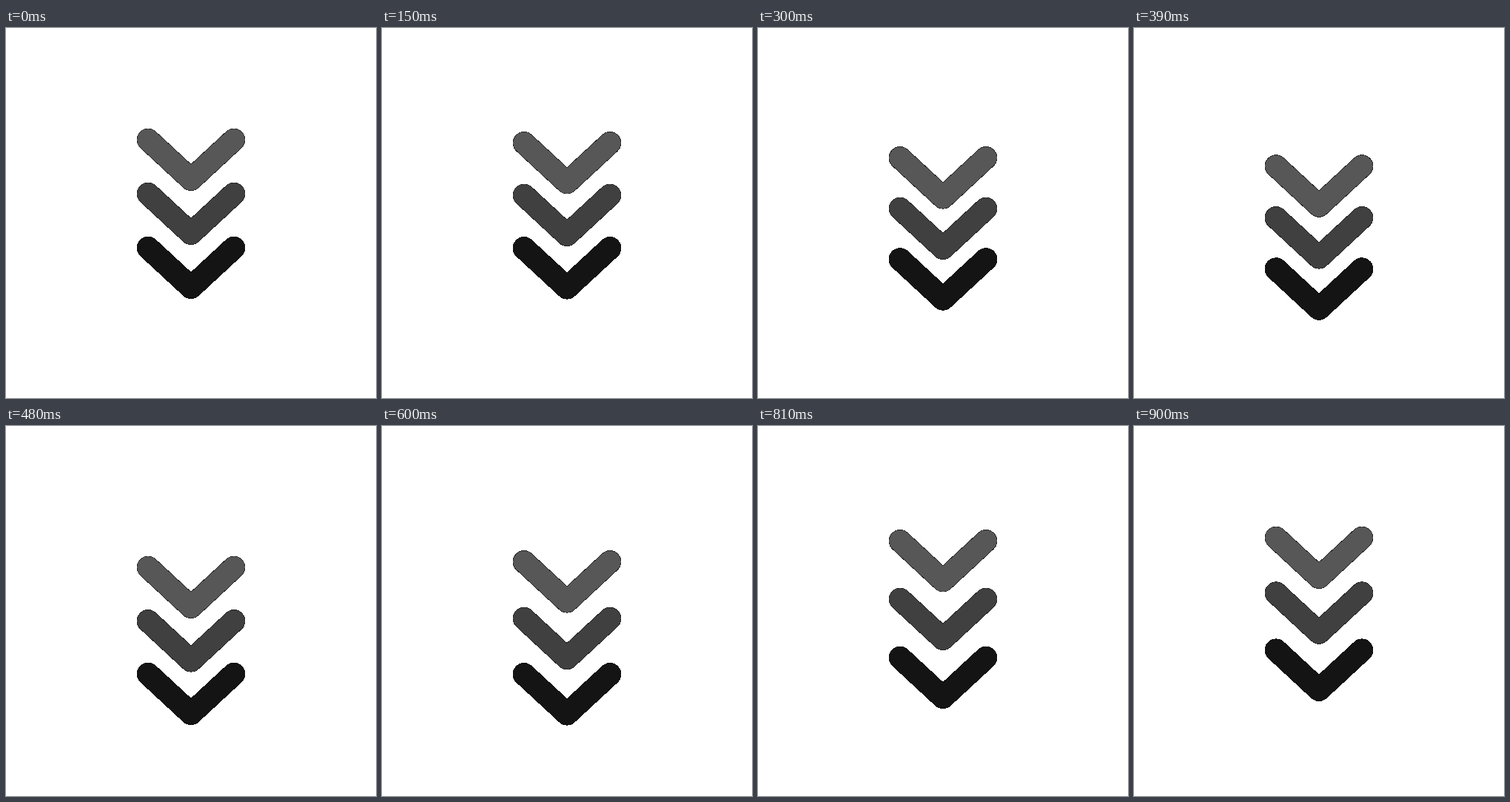
An HTML page for the animation above (930 ms loop, 500 by 500 pixels).

```html
<!DOCTYPE html>
<html>
<head>
<meta charset="utf-8">
<style>
  html, body { margin: 0; width: 100%; height: 100%; overflow: hidden; background: #fff; }
  svg { display: block; width: 500px; height: 500px; }
  use { fill: none; stroke-linecap: round; stroke-linejoin: round; shape-rendering: crispEdges; }
  .rim { stroke-width: 30.8; }
  .body { stroke-width: 29.2; }
</style>
</head>
<body>
<svg viewBox="0 0 500 500">
  <defs><path id="chevron" d="M192 151 L250 204.7 L308 151"/></defs>
</svg>
<script>
const LOOP = 930, STEP = 30, TRAVEL = 40, RISE = 420;
const NS = 'http://www.w3.org/2000/svg';
const svg = document.querySelector('svg');

// Each chevron starts a little later and returns a little slower.
const chevrons = [
  { color: '#575757', rim: '#222', y: 0, start: 60, back: 420 },
  { color: '#404040', rim: '#222', y: 73, start: 90, back: 450 },
  { color: '#141414', rim: '#0c0c0c', y: 146, start: 120, back: 480 },
];

function addStroke(group, className, color) {
  const use = document.createElementNS(NS, 'use');
  use.setAttribute('href', '#chevron');
  use.setAttribute('class', className);
  use.setAttribute('stroke', color);
  group.append(use);
}

for (const c of chevrons) {
  c.group = document.createElementNS(NS, 'g');
  addStroke(c.group, 'rim', c.rim);
  addStroke(c.group, 'body', c.color);
  svg.append(c.group);
}

const ease = p => (1 - Math.cos(Math.PI * Math.min(1, Math.max(0, p)))) / 2;

function draw(now) {
  const t = Math.floor((now % LOOP) / STEP) * STEP;
  for (const { group, y, start, back } of chevrons) {
    const shift = ease((t - start) / RISE) - ease((t - start - RISE) / back);
    group.setAttribute('transform', `translate(0 ${(y + TRAVEL * shift).toFixed(2)})`);
  }
}

const origin = performance.now();
function tick() {
  draw(performance.now() - origin);
  requestAnimationFrame(tick);
}
tick();
</script>
</body>
</html>
```
